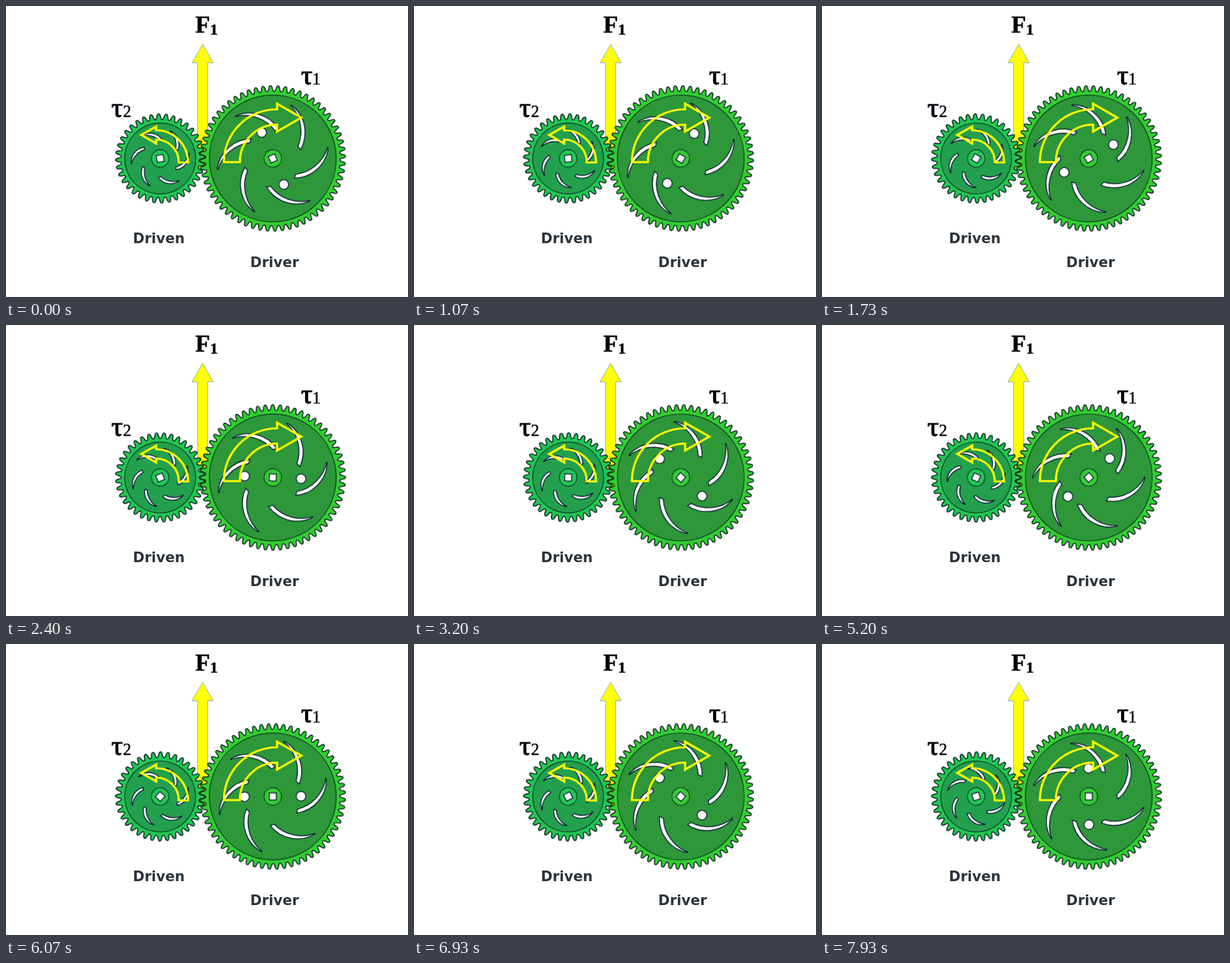
An HTML page that plays this animation: 605 px wide and 438 px high, repeating every 8000 ms.

```html
<!DOCTYPE html>
<html lang="en">
<head>
<meta charset="utf-8">
<title>Gear pair</title>
<style>
html, body { margin: 0; width: 100%; height: 100%; overflow: hidden; background: #fff; }
svg { display: block; width: 605px; height: 438px; }
.edge { stroke: #001014; stroke-width: 1.4; }
.thin { stroke: #001014; stroke-width: 1; }
.hole { fill: #fff; stroke: #00102c; stroke-width: 1.3; }
.turn { fill: none; stroke: #ff0; stroke-width: 3.2; }
.symbol { font-family: "Liberation Serif", serif; fill: #00000c; stroke: #00000c; stroke-width: .5; }
.bold { font-weight: bold; }
.tau { font-size: 43px; stroke-width: 1.1; }
.label { font: bold 21px "DejaVu Sans", sans-serif; fill: #2c343c; }
</style>
</head>
<body>
<svg viewBox="0 0 605 438">
  <path d="M288.500 245V85.500H280L296 57.500L312 85.500H303.500V245Z" fill="#ff0" stroke="#6d9fd0" stroke-width=".8"/>
  <g id="driven" transform="translate(232 229.500)"></g>
  <g id="driver" transform="translate(401.500 229.500)"></g>
  <path class="turn" d="M328 235A80 79 0 0 1 408 155.500V147L444.500 168L408 189V178.500A56 56 0 0 0 352 235Z"/>
  <path class="turn" d="M274 235.500A48 49 0 0 0 226 187V181.500L203.500 194L226 207V201A34 34 0 0 1 260 235.500Z"/>
  <g class="symbol">
    <g class="bold"><text x="285" y="40" font-size="36">F</text><text x="307" y="43" font-size="24">1</text></g>
    <text class="tau" x="444" y="117.500">τ</text><text x="461" y="118" font-size="25">1</text>
    <text class="tau" x="158.500" y="166.500">τ</text><text x="176" y="167" font-size="25">2</text>
  </g>
  <text class="label" x="191" y="356.500">Driven</text>
  <text class="label" x="367.500" y="392.500">Driver</text>
</svg>
<script>
const LOOP = 8000, STEPS = 120, STEP_ANGLE = 360 / 112;

const polar = (r, deg) => {
  const a = deg * Math.PI / 180;
  return `${(r * Math.cos(a)).toFixed(2)} ${(r * Math.sin(a)).toFixed(2)}`;
};

function rim({ teeth, pitch, depth, phase }) {
  const count = teeth * 20, points = [];
  for (let i = 0; i < count; i++) {
    const wave = Math.tanh(1.4 * Math.cos(i / 20 * 2 * Math.PI)) / Math.tanh(1.4);
    points.push(polar(pitch + depth * wave, phase + i * 360 / count));
  }
  return `M${points.join("L")}Z`;
}

// A curved slot runs from a narrow outer tip to an oblique inner end.
function slot({ tip, inner, blunt, sweep, cut, arcs }, angle) {
  return `M${polar(tip, angle + blunt)}A${arcs[0]} ${arcs[0]} 0 0 1 ${polar(inner, angle + sweep)}` +
    `L${polar(inner - 2, angle + cut)}A${arcs[1]} ${arcs[1]} 0 0 0 ${polar(tip, angle)}Z`;
}

function buildGear(id, gear) {
  const slots = [0, 1, 2, 3, 4, 5].map(i => slot(gear.slot, gear.slot.start + i * 60)).join("");
  const s = gear.square;
  const root = document.getElementById(id);
  root.innerHTML = `<g>
    <path class="edge" d="${rim(gear)}" fill="${gear.light}"/>
    <circle class="thin" r="${gear.disc}" fill="${gear.dark}"/>
    <path class="hole" d="${slots}"/>
    ${gear.holes.map(x => `<circle class="hole" cx="${x}" r="7.2"/>`).join("")}
    <circle class="thin" r="13.300" fill="${gear.light}"/>
    <rect class="hole" x="${-s / 2}" y="${-s / 2}" width="${s}" height="${s}"/>
  </g>`;
  const turn = deg => ({ transform: `rotate(${deg}deg)` });
  root.firstElementChild.animate(
    [turn(gear.start), turn(gear.start + gear.ratio * STEP_ANGLE * STEPS)],
    { duration: LOOP, iterations: Infinity, easing: `steps(${STEPS})`, delay: -4 });
}

buildGear("driver", {
  teeth: 60, pitch: 105.3, depth: 4.2, phase: 3.2, disc: 95.5,
  light: "#33cc33", dark: "#2d973a", start: 67, ratio: 1,
  slot: { tip: 84.5, inner: 44, blunt: 2, sweep: 54, cut: 46, arcs: [52, 57], start: -18.7 },
  holes: [-42.5, 42.5], square: 10.5
});
buildGear("driven", {
  teeth: 36, pitch: 63, depth: 4.2, phase: 8, disc: 53.5,
  light: "#22c653", dark: "#23a04d", start: -10, ratio: -5 / 3,
  slot: { tip: 44, inner: 29, blunt: 2, sweep: 46, cut: 40, arcs: [22, 28], start: 59 },
  holes: [], square: 10.5
});
</script>
</body>
</html>
```
